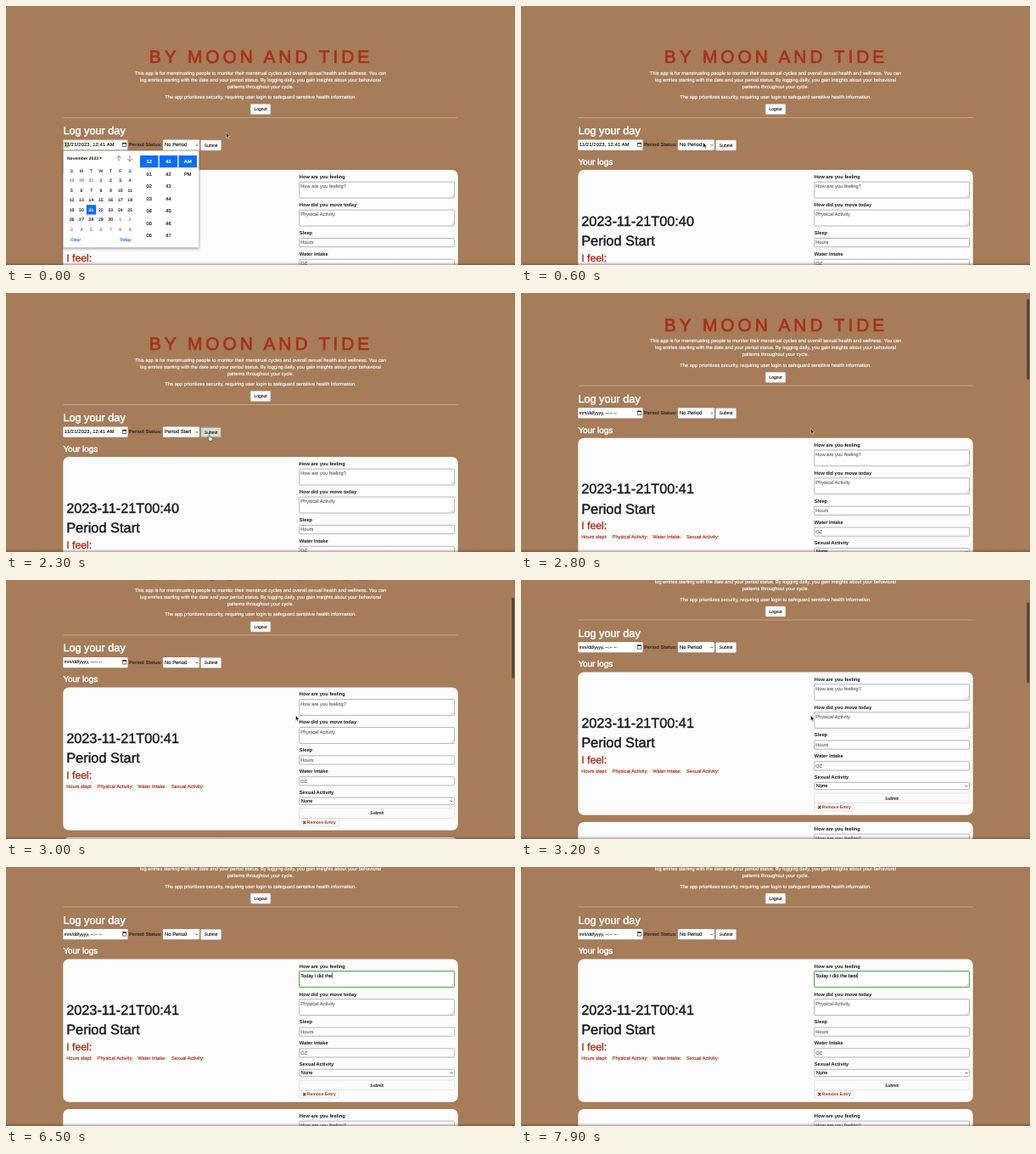
Recreate the animation shown at these times as an HTML page. Size 600 by 305 pixels, loop 8000 ms.

```html
<!DOCTYPE html>
<html lang="en">
<head>
<meta charset="utf-8">
<title>Cycle log</title>
<style>
html, body { margin: 0; width: 100%; height: 100%; overflow: hidden; background: #a67c59; }
svg { display: block; font-family: "Liberation Sans", Arial, sans-serif; text-rendering: geometricPrecision; }
text { white-space: pre; }
</style>
</head>
<body>
<svg id="stage" width="600" height="305" viewBox="0 0 600 305"></svg>
<script>
const RED = '#a52c16', INK = '#16191c', GREY = '#6c6c6c', BLUE = '#0a6cff', BODY = 5.72;

// A thin stroke in the text colour gives the slightly heavier weight.
const text = (x, y, s, size = BODY, fill = INK, more = '', weight = .025) =>
  `<text x="${x}" y="${y - .3}" font-size="${size}" fill="${fill}" stroke="${fill}" stroke-width="${size * weight}" ${more}>${s}</text>`;
const mid = (x, y, s, size, fill, more = '', weight) => text(x, y, s, size, fill, 'text-anchor="middle" ' + more, weight);
const bold = (x, y, s, size, fill) => text(x, y, s, size, fill, 'font-weight="700"', 0);
const box = (x, y, w, h, fill = '#fff', more = '') =>
  `<rect x="${x}" y="${y}" width="${w}" height="${h}" fill="${fill}" ${more}/>`;
const line = (d, stroke = '#222', w = .7) => `<path d="${d}" fill="none" stroke="${stroke}" stroke-width="${w}"/>`;
const group = (id, s) => `<g id="${id}">${s}</g>`;
const field = (x, y, w, h) => box(x, y, w, h, '#fff', 'stroke="#858585" stroke-width=".6" rx=".8"');
const button = (x, y, w, h, label) =>
  box(x, y, w, h, '#fbfbfb', 'stroke="#cfcac6" stroke-width=".5" rx="1"') +
  mid(x + w / 2, y + h / 2 + 2, label, 5);
const chevron = (x, y) => line(`M${x - 1.5} ${y - .8}l1.5 1.6 1.5-1.6`);
const grip = y => line(`M524.5 ${y - 1}l3.2-3.2M526.4 ${y - 1}l1.3-1.3`, '#777', .4);

function entry(dy, left) {
  const area = (y, id, hint) => group(id + dy, field(345.8, y, 182.7, 18.8)) + grip(y + 18.8) +
    group(id + 'hint' + dy, text(347.2, y + 7.3, hint, BODY, GREY));
  const input = (y, hint) => field(345.8, y, 182.7, 10.2) + text(347.2, y + 7.2, hint, BODY, GREY);
  const labels = [[203.3, 'How are you feeling'], [236.3, 'How did you move today'], [269.2, 'Sleep'],
    [294.1, 'Water Intake'], [319, 'Sexual Activity']];
  return `<g transform="translate(0 ${dy})">` +
    box(67.3, 193, 465.4, 168.3, '#fdfcfc', 'rx="6.8"') + left +
    labels.map(([y, s]) => bold(345.8, y, s)).join('') +
    area(207.2, 'feel', 'How are you feeling?') + area(240.2, 'move', 'Physical Activity') +
    input(273.5, 'Hours') + input(298.3, 'OZ') +
    field(345.8, 322.8, 182.7, 8.4) + text(347.8, 329, 'None') + chevron(525, 327) +
    button(345.8, 335.6, 182.7, 11.6, 'Submit') +
    box(345.8, 347.6, 46.5, 9, '#fbfbfb', 'stroke="#cfcac6" stroke-width=".5" rx="1"') +
    line('M350.2 350.5l3.2 3.4m0-3.4l-3.2 3.4', RED, 1.2) +
    bold(354.8, 354.1, 'Remove Entry', 5.06, RED) + '</g>';
}

function calendar() {
  let s = box(67.6, 170.4, 159.8, 114, '#fff', 'stroke="#b5a89c" stroke-width=".4" filter="url(#shade)"') +
    bold(72, 181.1, 'November 2023', 5, '#111') +
    '<path d="M110 178.3h3l-1.5 2z" fill="#111"/>' +
    line('M133 182.8v-6.4m-3 3l3-3 3 3M146 176.4v6.4m-3-3l3 3 3-3', '#555', .7) +
    box(94.8, 234.2, 11.4, 11.4, BLUE);
  [...'SMTWTFS'].forEach((d, i) => s += mid(77.5 + i * 11.45, 196, d, 5, '#222'));
  for (let i = 0; i < 42; i++) {
    const day = i - 2, inside = day > 0 && day < 31;
    const label = day < 1 ? day + 31 : inside ? day : day - 30;
    s += mid(77.5 + i % 7 * 11.45, 207.6 + Math.floor(i / 7) * 11.45, label, 5.1,
      day == 21 ? '#fff' : inside ? '#111' : '#777', day == 21 ? 'font-weight="700"' : '');
  }
  s += mid(82, 277.4, 'Clear', 5.1, BLUE) + mid(140.5, 277.4, 'Today', 5.1, BLUE);
  const hours = i => String(i ? i : 12).padStart(2, '0');
  [hours, i => 41 + i, i => ['AM', 'PM'][i] || ''].forEach((value, c) => {
    s += box(158 + c * 22.8, 176, 21.4, 14.2, BLUE);
    for (let i = 0; i < 7; i++)
      s += mid(168.7 + c * 22.8, 185.3 + i * 14.55, value(i), 5.7, i ? '#111' : '#fff', i ? '' : 'font-weight="700"');
  });
  return s;
}

function menu() {
  const items = ['No Period', 'Period Start', 'Period End', 'Period Spotty', 'Period Light', 'Period Heavy'];
  return box(182, 156.6, 52.5, 60.6, '#57493e', 'rx="3" stroke="#7d6a5a" stroke-width=".5" filter="url(#shade)"') +
    group('pick', box(184, 168.8, 48.5, 9.3, '#4fa83c', 'rx="1.5"')) +
    line('M186.4 164l1.2 1.7 2-3.6', '#fff', .8) +
    items.map((s, i) => text(191.8, 166.2 + i * 9.4, s, 5.85, '#fff')).join('');
}

const intro = [
  [81, 'This app is for menstruating people to monitor their menstrual cycles and overall sexual health and wellness. You can'],
  [89, 'log entries starting with the date and your period status. By logging daily, you gain insights about your behavioral'],
  [97, 'patterns throughout your cycle.'],
  [109.3, 'The app prioritizes security, requiring user login to safeguard sensitive health information.']];
const log = text(71.2, 258.8, '2023-11-21T00:40', 16.3, INK, 'id="stamp"') + text(71.2, 282.2, 'Period Start', 16.4) +
  text(71.2, 300.8, 'I feel:', 12.3, RED) +
  [[71.2, 'Hours slept:'], [107.6, 'Physical Activity:'], [155.3, 'Water Intake:'], [194.9, 'Sexual Activity:']]
    .map(([x, s]) => text(x, 311.6, s, BODY, RED)).join('');

stage.innerHTML = `<defs>
  <filter id="shade" x="-10%" y="-10%" width="120%" height="125%"><feDropShadow dx="0" dy="1.2" stdDeviation="1.4" flood-opacity=".4"/></filter>
  <linearGradient id="foot" x2="0" y2="1"><stop stop-color="#4a3f38" stop-opacity="0"/><stop offset="1" stop-color="#4a3f38" stop-opacity=".45"/></linearGradient>
  </defs>` + box(0, 0, 600, 305, '#a67c59') +
  group('page',
    mid(300.5, 67.2, 'BY MOON AND TIDE', 21, '#a8311a', 'letter-spacing="3.9"', .035) +
    intro.map(([y, s]) => mid(300, y, s, BODY, '#fff')).join('') +
    button(288.3, 115.6, 23.5, 12, 'Logout') +
    line('M67.3 131.5H532.7', '#d0bba9', .7) +
    text(67.4, 151.3, 'Log your day', 12.7, '#fff', '', .04) +
    box(67.3, 157.6, 76.2, 12.2, '#fff', 'rx="1"') +
    group('focusDate', box(67.5, 157.8, 75.8, 11.8, 'none', 'rx="1" stroke="#7fae6c" stroke-width=".6"') + box(68.4, 160, 6, 7.3, '#a9d8a4')) +
    group('filled', text(68.8, 165.6, '11/21/2023, 12:41 AM', BODY, '#111', 'letter-spacing=".17"')) +
    group('blank', text(68.6, 165.4, 'mm/dd/yyyy, --:-- --', 5.3, '#111')) +
    box(137.6, 161.2, 4.2, 4.4, 'none', 'stroke="#222" stroke-width=".6"') + box(137.6, 161, 4.2, 1.4, '#222') +
    bold(145, 165.5, 'Period Status:', BODY, '#2a211c') +
    box(185, 157.6, 43, 12.2, '#fff', 'rx="1"') +
    text(187, 165.6, 'No Period', 5.9, '#111', 'id="status"') + chevron(225, 163.8) +
    button(229.6, 158, 24, 12, 'Submit') +
    group('focusSubmit', box(229.8, 158.2, 23.6, 11.6, '#dedbd3', 'rx="1" stroke="#7d8a5c" stroke-width=".9"') + mid(241.6, 166, 'Submit', 5)) +
    text(67.4, 187.2, 'Your logs', 9.9, '#fff', '', .045) +
    entry(0, log) + entry(176.5, '') +
    group('typing', box(345.8, 207.2, 182.7, 18.8, 'none', 'stroke="#4cae45" stroke-width="1" rx=".8"') +
      text(347.2, 214.5, '', BODY, '#111', 'id="typed"') + box(0, 208.8, .6, 6.6, '#111', 'id="caret"')) +
    group('calendar', calendar()) + group('menu', menu())) +
  box(0, 301.5, 600, 3.5, 'url(#foot)') +
  group('bar', box(596.3, 0, 3, 95, '#4b443f', 'rx="1.5"')) +
  `<g id="cursor" stroke="#fff" stroke-width=".5">
    <path id="arrow" d="M0 0v6.2l1.4-1.3 1 2.2 1-.4-1-2.2h2z" fill="#111"/>
    <path id="hand" d="M0 .2q.8-.6 1.2.2v2.2l2.6.5q.9.3.7 1.3l-.6 2.6h-3.2l-2-2.6q0-1 1.3-.2z" fill="#fff" stroke="#222"/>
    <path id="beam" d="M-1-3h2M0-3v6M-1 3h2" stroke="#222" fill="none"/></g>`;

const $ = id => document.getElementById(id);
const show = (id, on) => $(id).setAttribute('visibility', on ? 'visible' : 'hidden');
const within = (t, a, b) => t >= a && t < b;

// Piecewise linear value through [time, value] points.
function track(t, points) {
  if (t <= points[0][0]) return points[0][1];
  for (let i = 1; i < points.length; i++) {
    const [a, u] = points[i - 1], [b, v] = points[i];
    if (t < b) return u + (v - u) * (t - a) / (b - a);
  }
  return points.at(-1)[1];
}

const scrollPath = [[2700, 0], [2800, 22], [2900, 47], [3000, 66.5], [3100, 78], [3200, 84.5]];
const cursorX = [[100, 259.5], [700, 206], [1000, 206], [1300, 220.5], [1700, 220.5], [2100, 239], [2500, 239], [2800, 341.5], [3700, 341.5], [4400, 392]];
const cursorY = [[100, 149], [700, 163], [1000, 163], [1300, 174.5], [1700, 174.5], [2100, 167], [2500, 167], [2800, 159.5], [3700, 159.5], [4400, 132]];
const keys = [[4700, 0], [5100, 4], [6200, 15], [7300, 15], [7800, 20]];
const phrase = 'Today i did the best';

function draw() {
  const t = performance.now() % 8000, sent = t >= 2500;
  const y = track(t, scrollPath);
  $('page').setAttribute('transform', `translate(0 ${-y})`);
  $('bar').setAttribute('transform', `translate(0 ${y * .31})`);
  show('bar', within(t, 2750, 4200));

  show('calendar', t < 500);
  show('focusDate', t < 500);
  show('menu', within(t, 900, 1600));
  show('pick', within(t, 1150, 1600));
  show('focusSubmit', within(t, 2100, 2500));
  show('filled', !sent);
  show('blank', sent);
  $('stamp').textContent = '2023-11-21T00:4' + (sent ? 1 : 0);
  $('status').textContent = within(t, 1600, 2500) ? 'Period Start' : 'No Period';

  const typed = phrase.slice(0, Math.floor(track(t, keys) + .001));
  show('typing', t >= 4500);
  show('feelhint0', !typed);
  $('typed').textContent = typed;
  $('caret').setAttribute('x', 347.2 + $('typed').getComputedTextLength());

  $('cursor').setAttribute('transform', `translate(${track(t, cursorX)} ${track(t, cursorY)})`);
  const hand = within(t, 2000, 2600), beam = within(t, 4100, 4700);
  show('hand', hand);
  show('beam', beam);
  show('arrow', t < 4100 && !hand);
  requestAnimationFrame(draw);
}
draw();
</script>
</body>
</html>
```
